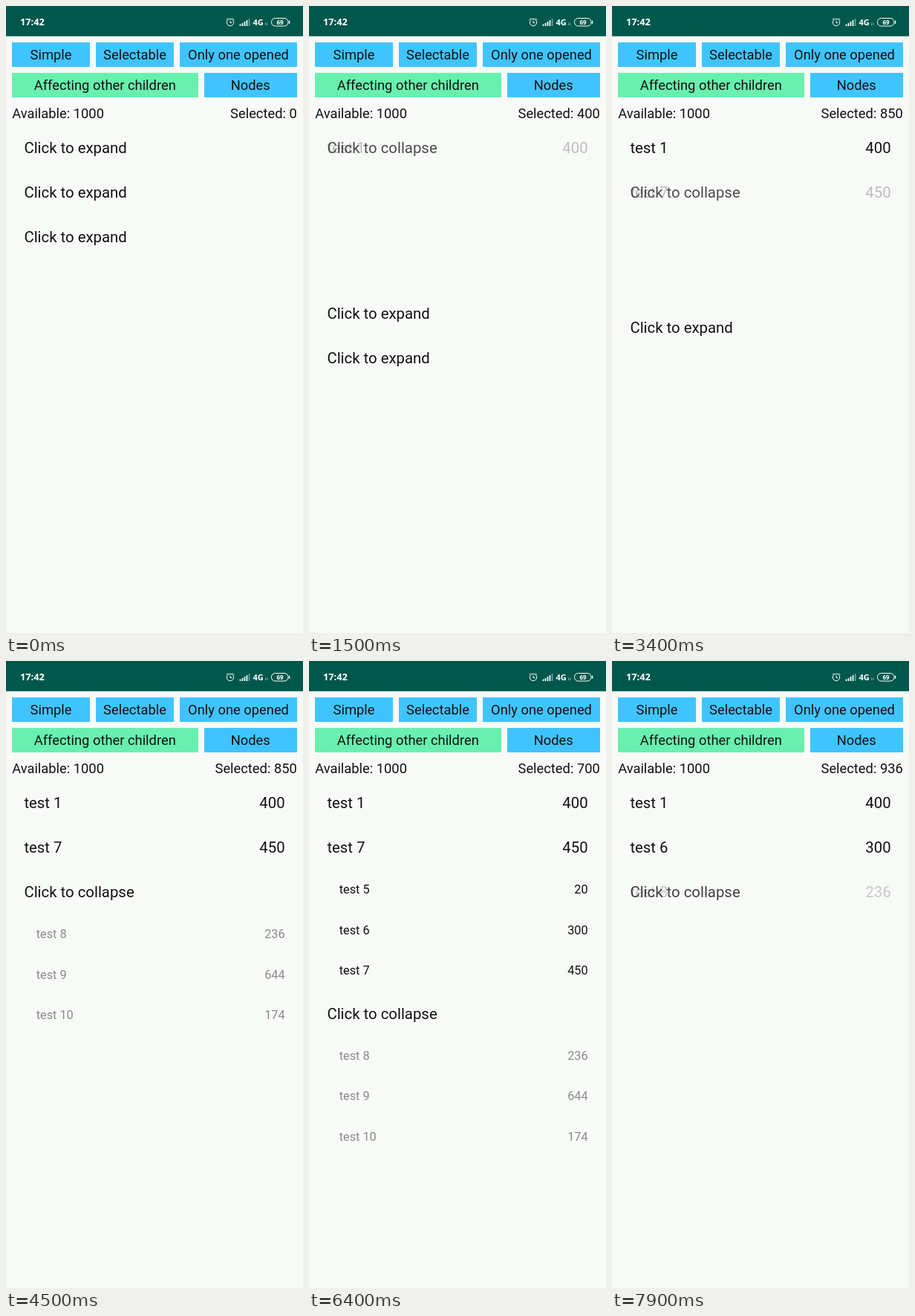
Write an HTML page that moves like this. It is 400 px wide and 844 px high and loops after 8 s.

```html
<!DOCTYPE html>
<html lang="en">
<head>
<meta charset="utf-8">
<title>Expandable list</title>
<style>
  html, body { margin: 0; width: 100%; height: 100%; overflow: hidden; background: #f8faf8; }
  #stage { position: relative; width: 400px; height: 844px; overflow: hidden;
    font: 18.33px Roboto, sans-serif; color: #111; white-space: nowrap; }
  #stage > svg { position: absolute; left: 0; top: 0; }
  .button, .info, .row { position: absolute; }
  .button { height: 33px; line-height: 33px; text-align: center; background: #40c4ff; }
  .button.active { background: #69f0ae; }
  .info { top: 134px; line-height: 21px; }
  .row { left: 0; top: 0; right: 24.4px; display: flex; justify-content: space-between; }
  .head { padding-left: 24.4px; font-size: 20.37px; line-height: 60px; }
  .child { padding-left: 40.7px; font-size: 16.3px; line-height: 54.5px; }
</style>
</head>
<body>
<div id="stage">
  <svg width="400" height="41" fill="none" stroke="#fff">
    <rect width="400" height="40.7" fill="#00574b" stroke="none"/>
    <g fill="#fff" stroke="none" font-family="Open Sans, sans-serif" font-weight="700">
      <text x="19" y="26.4" font-size="12.8">17:42</text>
      <text x="332.5" y="26" font-size="11">4G</text>
      <text x="364.5" y="24.7" font-size="8">69</text>
    </g>
    <circle cx="302" cy="22" r="4.7"/>
    <path d="M302 19.5V22.5H304.3M296.8 18.6L299 16.4M305 16.4L307.2 18.6"/>
    <path d="M315.5 27V24.5M318.5 27V23M321.5 27V21M324.5 27V19" stroke-width="1.7"/>
    <path d="M327.6 27V17" stroke-width="1.7" opacity=".45"/>
    <path d="M349.5 26V22.5M351.7 26V22.5" opacity=".5"/>
    <rect x="357.5" y="16.5" width="22.5" height="10.5" rx="5"/>
    <path d="M381.6 19.7V23.8" stroke-width="1.4"/>
  </svg>
  <div class="button" style="left:8px;top:49px;width:105px">Simple</div>
  <div class="button" style="left:121px;top:49px;width:105px">Selectable</div>
  <div class="button" style="left:234px;top:49px;width:158px">Only one opened</div>
  <div class="button active" style="left:8px;top:89.5px;width:250.5px">Affecting other children</div>
  <div class="button" style="left:266.5px;top:89.5px;width:125.5px">Nodes</div>
  <div class="info" style="left:8.2px">Available: 1000</div>
  <div class="info" id="selected" style="right:8.2px"></div>
</div>
<script>
const LOOP = 8000, TICK = 100, LIMIT = 1000;
const LIST_TOP = 161, HEAD_H = 60, CHILD_H = 54.5;
const FADE = 120, MOVE = 250;

// tap: the labels react; start: the list animation begins; pick: chosen child, closes the section
const events = [
  { tap: 200, start: 230, section: 0 },
  { tap: 1300, start: 1296, section: 0, pick: 0 },
  { tap: 2200, start: 2132, section: 1 },
  { tap: 3200, start: 3196, section: 1, pick: 2 },
  { tap: 4100, start: 4080, section: 2 },
  { tap: 5400, start: 5430, section: 1 },
  { tap: 6400, start: 6430, section: 1, pick: 1 },
  { tap: 7700, start: 7705, section: 2, pick: 0 }
];

const stage = document.getElementById('stage');
const selected = document.getElementById('selected');

function addRow(kind, name = '', value = '') {
  const el = document.createElement('div');
  el.className = 'row ' + kind;
  el.append(document.createElement('span'), document.createElement('span'));
  stage.append(el);
  setText(el, { name, value });
  return el;
}

function setText(el, { name, value = '' }) {
  el.firstChild.textContent = name;
  el.lastChild.textContent = value;
}

function place(el, y, opacity) {
  el.style.transform = `translateY(${y}px)`;
  el.style.opacity = opacity;
}

let number = 0;
const sections = [[400, 100, 30, 252], [20, 300, 450], [236, 644, 174]].map(values => {
  const children = values.map(value => ({ name: 'test ' + ++number, value }));
  return {
    children,
    heads: [addRow('head'), addRow('head')],
    rows: children.map(c => addRow('child', c.name, c.value))
  };
});

const ease = x => (1 - Math.cos(Math.PI * Math.min(1, Math.max(0, x)))) / 2;
const sum = picks => picks.reduce((total, p) => total + (p ? p.value : 0), 0);

function stateAt(t) {
  const state = sections.map(() => ({
    room: 0, alpha: 0, mix: 1, old: { name: '' }, head: { name: 'Click to expand' }
  }));
  let picks = [null, null, null], before = picks, change = 1;
  for (const { tap, start, section, pick } of events) {
    if (t < tap) break;
    const s = state[section], dt = t - start;
    before = picks;
    if (pick === undefined) {
      s.room = ease(dt / MOVE);
      s.alpha = ease((dt - MOVE) / FADE);
      if (!picks[section]) s.head = { name: 'Click to collapse' };
    } else {
      change = s.mix = ease((dt - FADE) / MOVE);
      s.room = 1 - change;
      s.alpha = 1 - ease(dt / FADE);
      s.old = s.head;
      s.head = sections[section].children[pick];
      picks = picks.slice();
      picks[section] = s.head;
    }
  }
  return { state, picks, before, change };
}

// A child is dimmed when choosing it would exceed the limit.
function strength(picks, section, value) {
  const others = sum(picks.filter((_, i) => i !== section));
  return others + value > LIMIT ? 0.48 : 1;
}

function draw(t) {
  const { state, picks, before, change } = stateAt(t);
  selected.textContent = 'Selected: ' + sum(picks);
  let y = LIST_TOP;
  sections.forEach(({ children, heads, rows }, i) => {
    const s = state[i];
    setText(heads[0], s.old);
    setText(heads[1], s.head);
    place(heads[0], y, 1 - s.mix);
    place(heads[1], y, s.mix);
    rows.forEach((row, n) => {
      const { value } = children[n];
      const from = strength(before, i, value), to = strength(picks, i, value);
      place(row, y + HEAD_H + n * CHILD_H, s.alpha * (from + (to - from) * change));
    });
    y += HEAD_H + rows.length * CHILD_H * s.room;
  });
}

const origin = performance.now();
function frame() {
  const t = (performance.now() - origin) % LOOP;
  draw(Math.floor(t / TICK) * TICK);
  requestAnimationFrame(frame);
}
frame();
</script>
</body>
</html>
```
